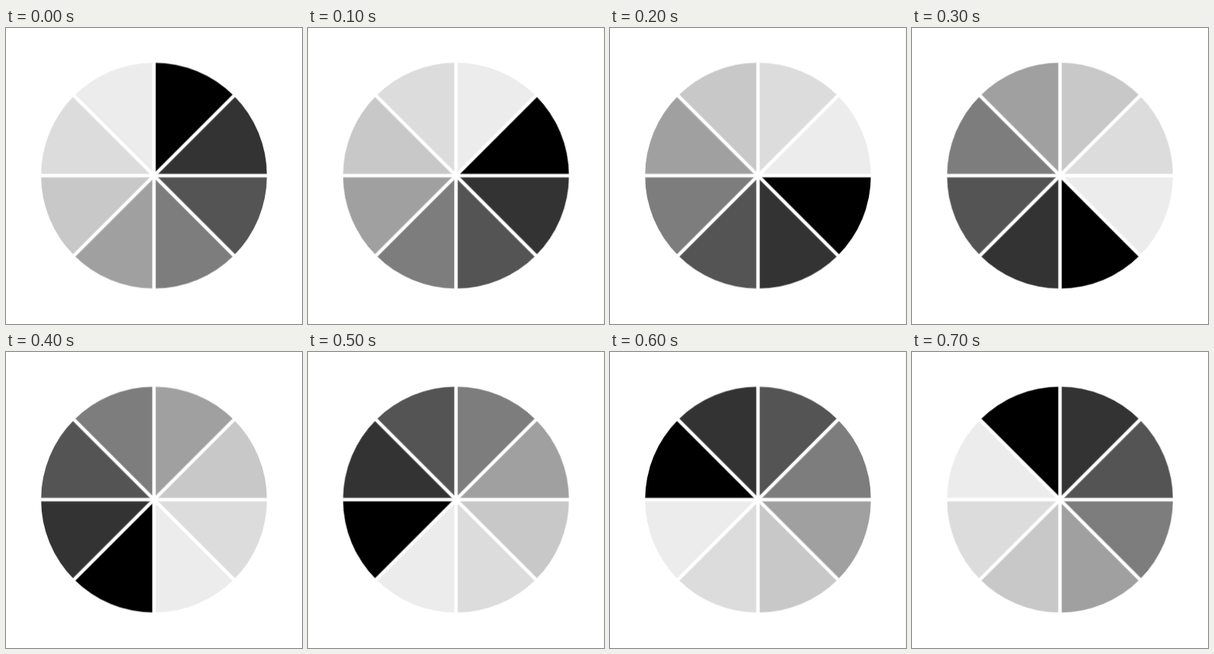
Animation of 390x390 px, one loop 0.8 s. Source, as an HTML page:

```html
<!DOCTYPE html>
<html lang="en">
<head>
<meta charset="utf-8">
<title>Spinner</title>
<style>
  html, body { margin: 0; width: 100%; height: 100%; overflow: hidden; background: #fff; }
  svg { display: block; width: 100vw; height: 100vh; }
  .wheel { animation: spin 800ms steps(8, end) infinite; }
  .spokes { stroke: #fff; stroke-width: 4.6; }
  @keyframes spin { to { transform: rotate(360deg); } }
</style>
</head>
<body>
<svg viewBox="0 0 390 390">
  <defs>
    <path id="wedge" d="M0 0V-148.8A148.8 148.8 0 0 1 105.217 -105.217Z"/>
    <path id="spoke" d="M0 -155V155"/>
  </defs>
  <g transform="translate(195 194.5)">
    <g class="wheel">
      <use href="#wedge" fill="#000"/>
      <use href="#wedge" fill="#333" transform="rotate(45)"/>
      <use href="#wedge" fill="#545454" transform="rotate(90)"/>
      <use href="#wedge" fill="#7d7d7d" transform="rotate(135)"/>
      <use href="#wedge" fill="#a0a0a0" transform="rotate(180)"/>
      <use href="#wedge" fill="#c8c8c8" transform="rotate(225)"/>
      <use href="#wedge" fill="#dcdcdc" transform="rotate(270)"/>
      <use href="#wedge" fill="#ececec" transform="rotate(315)"/>
    </g>
    <g class="spokes">
      <use href="#spoke"/>
      <use href="#spoke" transform="rotate(45)"/>
      <use href="#spoke" transform="rotate(90)"/>
      <use href="#spoke" transform="rotate(135)"/>
    </g>
  </g>
</svg>
</body>
</html>
```
